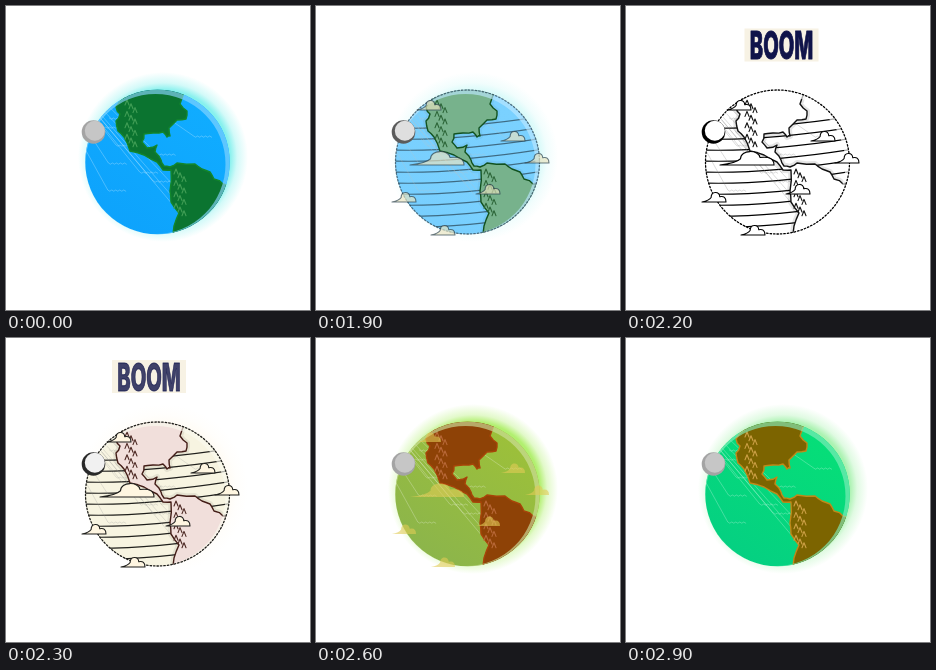
These frames come from a looping animation (304 px wide and 304 px high, 3.7 s). An HTML page with a canvas:

```html
<!DOCTYPE html>
<html lang="en">
<head>
<meta charset="utf-8">
<title>Boom</title>
<style>
  html, body { margin: 0; width: 100%; height: 100%; overflow: hidden; background: #fff; }
  canvas { display: block; }
</style>
</head>
<body>
<canvas width="304" height="304"></canvas>
<script>
const ctx = document.querySelector('canvas').getContext('2d');
const LOOP = 3700, START = 1800, STEP = 100, LAST = 11;

// Key moods of the planet; every other colour is derived from these.
const BLUE = { sea: '#10acff', land: '#0b7430', edge: '#12862b', glow: '#60ece8', ink: 0, lines: 0, clouds: 0 };
const INK = { sea: '#ffffff', land: '#ffffff', edge: '#111111', glow: '#ffffff', ink: 1, lines: 1, clouds: 1 };
const GOLD = { sea: '#dfd288', land: '#c6806e', edge: '#d8402a', glow: '#ffc040', ink: 0, lines: 1, clouds: 1 };
const OLIVE = { sea: '#9cc03a', land: '#8e4206', edge: '#a84408', glow: '#98ea40', ink: 0, lines: 0, clouds: 0.6 };
const GREEN = { sea: '#06de78', land: '#7c6400', edge: '#c08818', glow: '#90ee98', ink: 0, lines: 0, clouds: 0 };
const KEYS = [[-1, BLUE], [2, INK], [4, INK], [6, GOLD], [8, OLIVE], [LAST, GREEN]];

const BOOM_SPOTS = [[155.5, 53], [143, 52.5], [158.5, 66.5]];

let seed = 7;
const random = () => (seed = seed * 16807 % 2147483647) / 2147483647;
const lerp = (a, b, t) => a + (b - a) * t;
const hex = n => Math.round(n).toString(16).padStart(2, '0');
const fade = (color, alpha) => color + hex(alpha * 255);

function mix(a, b, t) {
  const part = (c, i) => parseInt(c.substr(i, 2), 16);
  return '#' + [1, 3, 5].map(i => hex(lerp(part(a, i), part(b, i), t))).join('');
}

// A closed coast through key points, each stretch bent a little.
function coast(points) {
  const path = new Path2D();
  points.forEach(([x, y], i) => {
    const [nx, ny] = points[(i + 1) % points.length];
    path.lineTo(x, y);
    path.lineTo((x + nx) / 2 + random() * 2 - 1, (y + ny) / 2 + random() * 2 - 1);
  });
  path.closePath();
  return path;
}

const LAND = coast([
  [118, 92], [125, 78], [180, 78], [174, 98], [181, 105], [180, 113], [171, 114], [163, 122], [164, 130], [161, 131],
  [157, 126], [147, 127], [138, 128], [136, 136], [141, 142], [151, 139], [149, 146], [155, 154], [158, 160], [164, 161],
  [171, 157], [189, 158], [196, 163], [204, 166], [208, 173], [217, 178], [230, 182], [185, 240], [167, 232],
  [168, 220], [173, 207], [165, 196], [164, 185], [165, 164], [157, 164], [151, 156],
  [138, 149], [124, 145], [118, 131], [112, 125], [110, 115], [114, 108], [110, 101]
]);

const CURRENTS = new Path2D();
for (let y = 122; y < 230; y += 11) {
  CURRENTS.moveTo(76, y);
  CURRENTS.quadraticCurveTo(140, y + 2, 228, y - 12);
}

const WAVES = new Path2D();
for (let y = 112; y < 220; y += 9) {
  const x = 88 + random() * 100;
  for (let i = 0; i < 10; i++) WAVES.lineTo(x + i * 2, y + i % 2 * 1.2);
  WAVES.moveTo(0, 0);
}

const PEAKS = new Path2D();
function range(x, top, bottom) {
  for (let y = top, i = 0; y < bottom; y += 3.8, i++) {
    const px = x + (i % 3 - 1) * 4;
    PEAKS.moveTo(px - 2, y + 3);
    PEAKS.lineTo(px, y - 2);
    PEAKS.lineTo(px + 2, y + 3);
  }
}
range(125, 96, 138);
range(174, 165, 208);

const CLOUDS = new Path2D();
function cloud(x, y, w) {
  const h = 6 + w * 0.12;
  CLOUDS.moveTo(x, y);
  CLOUDS.quadraticCurveTo(x + w * 0.3, y - h * 0.15, x + w * 0.38, y - h * 0.5);
  CLOUDS.bezierCurveTo(x + w * 0.38, y - h * 1.25, x + w * 0.72, y - h * 1.25, x + w * 0.74, y - h * 0.6);
  CLOUDS.quadraticCurveTo(x + w, y - h * 0.75, x + w, y);
  CLOUDS.closePath();
}
[[101, 104], [185, 135], [209, 157], [160, 188], [76, 196], [115, 229]].forEach(([x, y]) => cloud(x, y, 24));
cloud(94, 159, 54);

// Colours gather pace between two moods, lines and clouds move evenly.
function moodAt(step) {
  const i = Math.max(1, KEYS.findIndex(([at]) => at >= step));
  const [from, a] = KEYS[i - 1], [to, b] = KEYS[i];
  const t = (step - from) / (to - from), c = {};
  for (const name in a) {
    c[name] = name === 'lines' || name === 'clouds' ? lerp(a[name], b[name], t)
      : name === 'ink' ? lerp(a.ink, b.ink, t * t)
      : mix(a[name], b[name], t * t);
  }
  c.line = fade(mix(mix(c.sea, '#000000', 0.5), '#000000', c.ink), c.lines);
  return c;
}

function disc(x, y, r, fill) {
  ctx.beginPath();
  ctx.arc(x, y, r, 0, 7);
  if (fill) { ctx.fillStyle = fill; ctx.fill(); }
}

function stroke(color, width, path) {
  ctx.strokeStyle = color;
  ctx.lineWidth = width;
  path ? ctx.stroke(path) : ctx.stroke();
}

function gradient(g, ...stops) {
  stops.forEach(([at, color]) => g.addColorStop(at, color));
  return g;
}

function drawGlow(c) {
  const a = 1 - c.ink;
  disc(157, 151, 85, gradient(ctx.createRadialGradient(157, 151, 67, 157, 151, 85),
    [0, fade(c.glow, 0.75 * a)], [0.4, fade(c.glow, 0.28 * a)], [1, fade(c.glow, 0)]));
}

function drawGlobe(c) {
  ctx.save();
  disc(151.5, 156, 72.3, gradient(ctx.createLinearGradient(185, 95, 105, 215),
    [0, c.sea], [1, mix(c.sea, '#0050e0', 0.1 * (1 - c.ink) * (1 - c.lines))]));
  ctx.clip();
  stroke(c.line, 1.2, CURRENTS);
  stroke(fade(mix('#ffffff', '#707070', c.ink), 0.25), 1, WAVES);
  stroke(fade('#000000', 0.1 * c.ink), 6, LAND);

  ctx.fillStyle = c.land;
  ctx.fill(LAND);
  stroke(c.edge, 1.4, LAND);
  stroke(mix(c.edge, '#ffffff', 0.2 * (1 - c.ink)), 1.1, PEAKS);

  // light along the upper right limb
  disc(151.5, 156, 72.3);
  ctx.moveTo(219.5, 158);
  ctx.arc(149.5, 158, 70, 0, 7);
  ctx.fillStyle = fade(mix(c.sea, '#ffffff', 0.5), 0.65);
  ctx.fill('evenodd');
  ctx.restore();

  disc(151.5, 156, 72);
  ctx.setLineDash([1.5, 2]);
  stroke(c.line, 1.3);
  ctx.setLineDash([]);
}

function drawClouds(c) {
  const warm = mix(mix(c.sea, '#ffcf60', 0.7), '#ffffff', Math.max(c.ink, c.lines * 0.4));
  ctx.fillStyle = fade(warm, c.clouds);
  ctx.fill(CLOUDS);
  stroke(c.line, 1.1, CLOUDS);
}

function drawMoon(c) {
  disc(87.5, 126, 11.8, mix('#a4a4a4', '#000000', c.ink));
  disc(88.8, 124.7, 10, mix('#c6c6c6', '#ffffff', c.ink));
}

function drawBoom(step) {
  ctx.save();
  ctx.translate(...BOOM_SPOTS[Math.max(0, step - 4)]);
  ctx.fillStyle = '#f7f2e4';
  ctx.fillRect(-37, -30.5, 74, 33);
  ctx.globalAlpha = 1 - 0.2 * Math.max(0, step - 4);
  ctx.scale(0.53, 1); // condensed lettering
  ctx.font = '800 38px Inter, "Liberation Sans", sans-serif';
  ctx.textAlign = 'center';
  ctx.fillStyle = ctx.strokeStyle = '#10144a';
  ctx.lineWidth = 1;
  ctx.fillText('BOOM', 0, 0);
  ctx.strokeText('BOOM', 0, 0);
  ctx.restore();
}

function frame() {
  const time = performance.now() % LOOP;
  const step = Math.max(-1, Math.min(LAST, Math.floor((time - START) / STEP)));
  const c = moodAt(step);
  ctx.fillStyle = '#fff';
  ctx.fillRect(0, 0, 304, 304);
  ctx.lineJoin = ctx.lineCap = 'round';
  drawGlow(c);
  drawGlobe(c);
  drawClouds(c);
  drawMoon(c);
  if (step >= 2 && step <= 6) drawBoom(step);
  requestAnimationFrame(frame);
}
frame();
</script>
</body>
</html>
```
